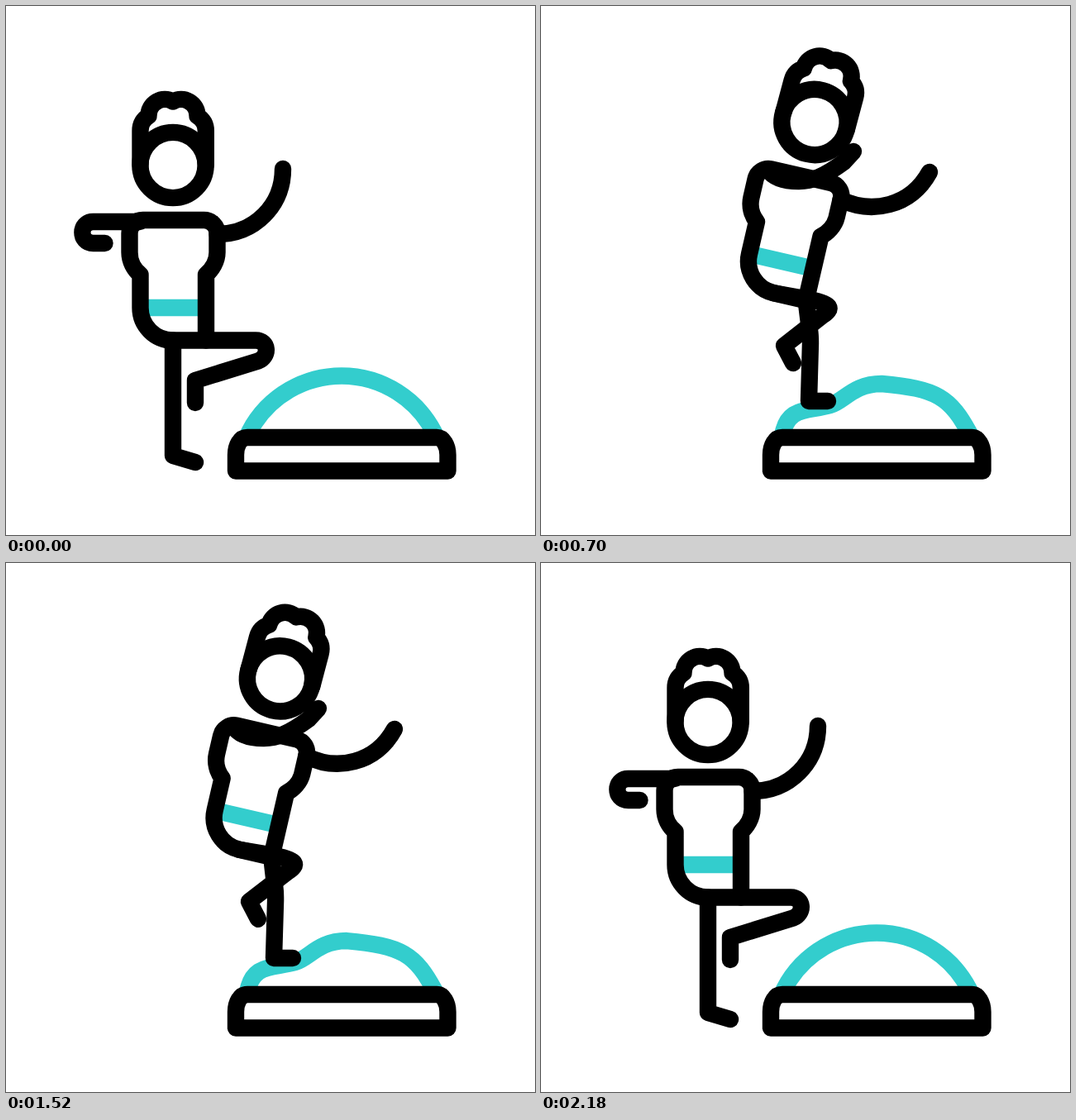
Animation, 640 px wide and 640 px high, one loop 2400 ms. Source, as an HTML page:

```html
<!DOCTYPE html>
<html lang="en">
<head>
<meta charset="utf-8">
<title>Balance dome step-up</title>
<style>
  html, body { margin: 0; width: 100%; height: 100%; overflow: hidden; background: #fff; }
  svg { display: block; width: 100%; height: 100%; }
  path, circle { fill: none; stroke: #000; stroke-width: 20.4; stroke-linecap: round; stroke-linejoin: round; }
  .teal { stroke: #33cdcd; stroke-linecap: butt; }
</style>
</head>
<body>
<svg viewBox="0 0 640 640">
  <path id="dome" class="teal"/>
  <path d="M278 562.5V543C278 532 283 522 292 522H521C529 522 534.5 532 534.5 543V562.5Z"/>
  <g id="torso">
    <path class="teal" d="M163 365H242"/>
    <path d="M162.5 325V365A39.5 39.5 0 0 0 202 404.5H242V325C249 319 255.5 309 255.5 298V275A16 16 0 0 0 239.5 259H165.5A16 16 0 0 0 149.5 275V298C149.5 309 155 319 162.5 325Z"/>
  </g>
  <path id="rearLeg"/>
  <path id="frontLeg"/>
  <path id="rearArm"/>
  <path id="frontArm"/>
  <g id="head">
    <circle cx="202" cy="192.5" r="39.6"/>
    <path d="M162.5 192V151C162.5 143 166 137 172.5 133A19.8 19.8 0 0 1 202 115.500A19.8 19.8 0 0 1 231.500 133C238 137 241.800 143 241.800 151V192"/>
  </g>
</svg>
<script>
  const LOOP = 2400, STEP = 20, TOP = 1090;
  const HIP = [242, 404.5], FACE = [202, 192.5];

  // Smooth track through rows of [time, ...values], without overshoot.
  function track(rows) {
    const last = rows.length - 1;
    const slope = (i, c) => (rows[i + 1][c] - rows[i][c]) / (rows[i + 1][0] - rows[i][0]);
    const tangent = (i, c) => {
      if (i === 0 || i === last) return 0;
      const a = slope(i - 1, c), b = slope(i, c);
      return a * b > 0 ? 2 * a * b / (a + b) : 0;
    };
    return time => {
      if (time <= rows[0][0]) return rows[0].slice(1);
      if (time >= rows[last][0]) return rows[last].slice(1);
      let i = 0;
      while (time > rows[i + 1][0]) i++;
      const a = rows[i], b = rows[i + 1], h = b[0] - a[0];
      const s = (time - a[0]) / h, r = 1 - s;
      return a.slice(1).map((v, k) => {
        const c = k + 1;
        return v * (1 + 2 * s) * r * r + b[c] * s * s * (3 - 2 * s)
          + h * s * r * (r * tangent(i, c) - s * tangent(i + 1, c));
      });
    };
  }

  // x, y, angle
  const torso = track([
    [0, 242, 404.5, 0],
    [320, 246, 404, 13],
    [400, 260, 391, 13],
    [560, 294, 366, 13],
    [700, 320.6, 356.3, 13],
    [770, 324, 352, 13],
    [950, 314.5, 366, 10],
    [1090, 310, 372, 8.5]
  ]);
  const head = track([
    [0, 202, 192.5, 0],
    [320, 266, 194, 30.5],
    [400, 279.5, 180, 30],
    [540, 305, 152, 22],
    [700, 331, 140.5, 15],
    [770, 334, 135.3, 14],
    [950, 313.5, 150.5, 10],
    [1090, 308, 156, 8]
  ]);

  // thigh end, knee curve, ankle, toe
  const rearLeg = track([
    [0, 202, 470, 202, 474, 202, 478, 202, 482, 202, 544, 229, 552],
    [320, 215, 464, 216, 468, 216, 472, 214, 477, 203, 544, 229, 552],
    [400, 233, 441, 234, 445, 234, 449, 231, 456, 223, 507, 247, 519],
    [700, 325, 355, 352, 360, 354, 366, 340, 375, 294, 411, 305, 432],
    [770, 327, 350, 355, 355, 356, 361, 342, 369, 294, 402, 304, 424],
    [950, 295, 402, 299, 410, 301, 418, 298, 428, 284.5, 479.5, 311, 479.5],
    [1090, 296, 408, 299, 414, 301, 420, 299, 430, 284.5, 479.5, 311, 479.5]
  ]);
  const frontLeg = track([
    [0, 302, 404.5, 318, 404.5, 319, 424, 305, 429.5, 229, 453, 229, 480],
    [340, 272, 396, 316, 396, 325, 403, 324, 421, 324, 478, 345, 479],
    [400, 275, 391, 318, 393, 326, 402, 324, 420, 324, 479, 346, 479],
    [700, 325, 392, 326, 398, 326, 402, 326, 408, 324, 478, 347, 478],
    [950, 331, 408, 334, 416, 334, 420, 332, 428, 325, 478, 347, 478],
    [1090, 332, 412, 335, 419, 335, 423, 333, 431, 325, 478, 347, 478]
  ]);

  // two curves, then the hand
  const rearArm = track([
    [0, 140, 261, 120, 261, 105.5, 261, 88, 261, 88, 287, 105.5, 287, 119.5, 287],
    [320, 201, 272, 208, 295, 222, 311, 232, 323, 244, 334, 258, 337, 269, 338],
    [400, 213, 262, 224, 283, 240, 296, 254, 307, 268, 312, 285, 312, 296, 312],
    [700, 282, 209, 296, 212, 312, 212, 328, 212, 343, 206, 366, 189, 378, 176],
    [950, 266, 220, 281, 223, 297, 222, 313, 221, 329, 214, 352, 194, 362, 180]
  ]);
  const frontArm = track([
    [0, 301, 276, 335, 241, 335, 197],
    [320, 302, 320, 334, 358, 378, 346],
    [400, 312, 300, 352, 335, 403, 319],
    [700, 400, 252, 447, 243, 470, 201],
    [950, 385, 257, 434, 247, 456, 202]
  ]);

  const round = [302.9, 496.7, 320.7, 477.3, 343, 464.4, 362.2, 453.4, 383.9, 447.5, 406, 447.5, 454.8, 447.5, 499.3, 475.8];
  const dome = track([
    [0, ...round],
    [290, ...round],
    [400, 297, 488, 322, 488, 345, 475, 362, 464, 380, 452, 406, 452, 455, 452, 494, 470],
    [700, 298, 484, 322, 491, 350, 483, 367, 478, 378, 457, 412, 457, 478, 463, 495, 472],
    [950, 297, 484, 322, 491, 351, 484, 368, 479, 379, 458, 413, 458, 480, 464, 496, 472]
  ]);

  // Going back down runs the climb in reverse with its own pacing.
  const descent = track([
    [1090, 1090], [1260, 950], [1430, 770], [1520, 708],
    [1630, 603], [1800, 388], [2180, 0]
  ]);

  const $ = id => document.getElementById(id);
  const draw = (id, d) => $(id).setAttribute("d", d);
  const place = (id, [x, y, a], [px, py]) =>
    $(id).setAttribute("transform", `translate(${x - px} ${y - py}) rotate(${a} ${px} ${py})`);

  // Where a point of the upright torso sits in the current pose.
  function onTorso([x, y, a], px, py) {
    const r = a * Math.PI / 180, c = Math.cos(r), s = Math.sin(r);
    const dx = px - HIP[0], dy = py - HIP[1];
    return [x + dx * c - dy * s, y + dx * s + dy * c];
  }

  const leg = (hip, p) => `M${hip}L${p.slice(0, 2)}C${p.slice(2, 8)}L${p.slice(8)}`;

  function render(t) {
    const u = t < TOP ? t : descent(t)[0];
    const body = torso(u);
    place("torso", body, HIP);
    place("head", head(u), FACE);
    draw("rearLeg", leg(onTorso(body, 202, 404.5), rearLeg(u)));
    draw("frontLeg", leg(onTorso(body, ...HIP), frontLeg(u)));
    const arm = rearArm(u);
    draw("rearArm", `M${onTorso(body, 162, 261)}C${arm.slice(0, 12)}L${arm.slice(12)}`);
    draw("frontArm", `M${onTorso(body, 255.5, 276)}C${frontArm(u)}`);
    draw("dome", `M292 520C${dome(u)} 520 520`);
  }

  const start = performance.now();
  function tick(now) {
    const t = Math.max(0, now - start) % LOOP;
    render(Math.floor(t / STEP) * STEP);
    requestAnimationFrame(tick);
  }
  render(0);
  requestAnimationFrame(tick);
</script>
</body>
</html>
```
